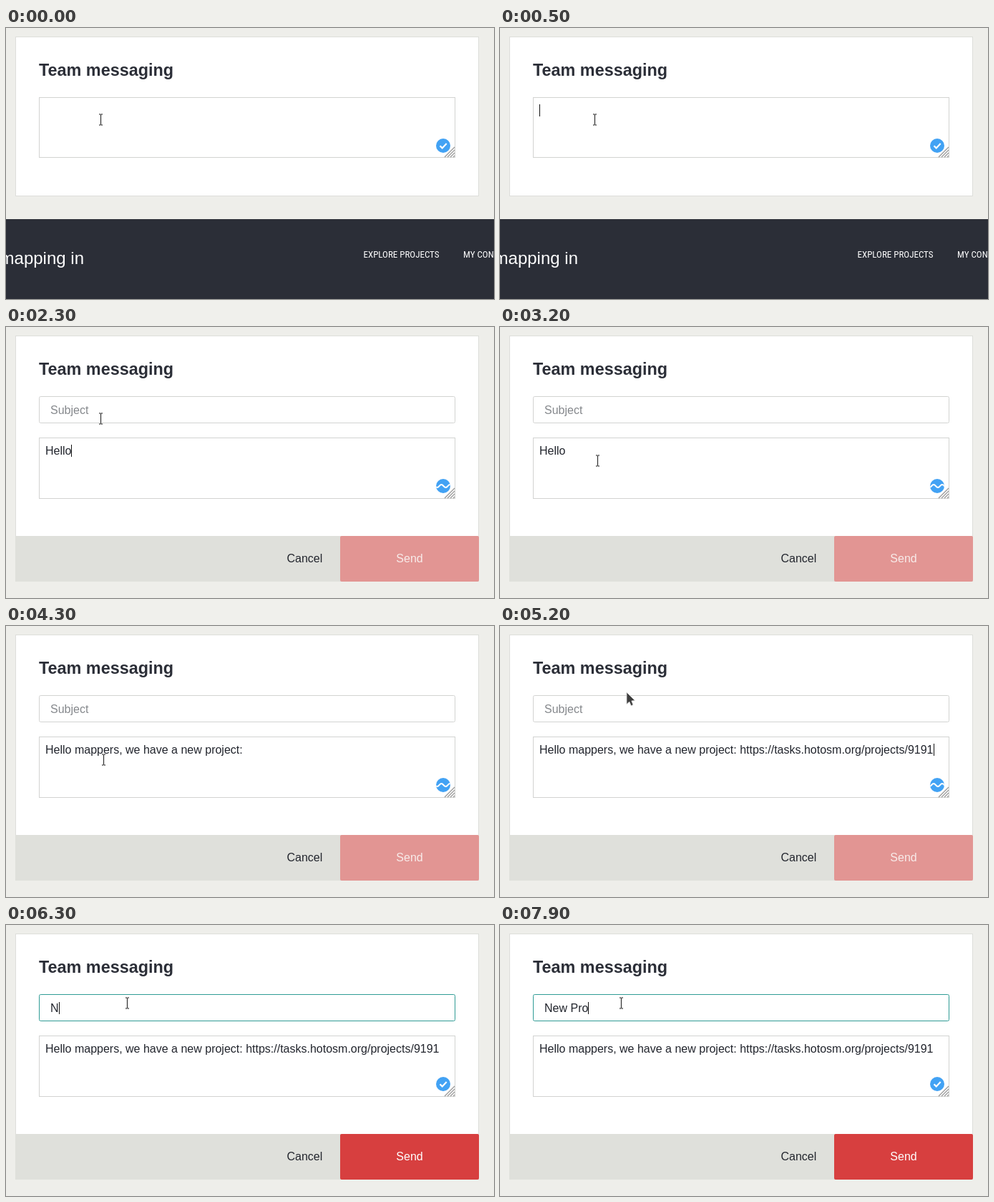
Write an HTML page that moves like this. It is 682 px wide and 380 px high and loops after 8 s.

```html
<!DOCTYPE html>
<html lang="en">
<head>
<meta charset="utf-8">
<title>Team messaging</title>
<style>
html, body { margin: 0; width: 100%; height: 100%; overflow: hidden; background: #eeeeea; }
svg { display: block; }
text { font: 16px "Liberation Sans", Arial, sans-serif; fill: #22252d; white-space: pre; }
.title { font-size: 23.4px; font-weight: 600; fill: #2b2e37; }
.tagline { font-size: 24px; fill: #fff; }
.link { font: 13px "Roboto Condensed", Roboto, sans-serif; font-stretch: 75%; fill: #fff; }
.box { fill: #fff; stroke: #d2d3d1; }
</style>
</head>
<body>
<svg width="682" height="380" viewBox="0 0 682 380">
  <defs><clipPath id="disc"><circle r="10"/></clipPath></defs>
  <rect id="card" x="13.5" y="12.5" width="647" height="223" fill="#fff" stroke="#dddeda"/>
  <text class="title" x="46" y="67">Team messaging</text>

  <g id="footer">
    <rect y="268" width="682" height="112" fill="#2b2e37"/>
    <text class="tagline" x="109" y="331" text-anchor="end">mapping in</text>
    <text class="link" x="499.5" y="322">EXPLORE PROJECTS</text>
    <text class="link" x="639" y="322">MY CONTRIBUTIONS</text>
  </g>

  <g id="form">
    <rect id="field" class="box" x="46.5" y="97.5" width="581" height="37" rx="2"/>
    <text id="subject" x="62" y="122"></text>
    <rect x="13" y="293" width="648" height="64" fill="#dfe0db"/>
    <text x="392.5" y="330">Cancel</text>
    <rect id="send" x="467" y="293" width="194" height="64" rx="2"/>
    <text id="sendLabel" x="564" y="330" text-anchor="middle">Send</text>
  </g>

  <rect id="area" class="box" x="46.5" width="581"/>
  <path id="grip" d="M613 0l14-14M617 0l10-10M621 0l6-6M625 0l2-2" stroke="#999" stroke-width="1.3"/>
  <text id="message" x="55" y="179"></text>
  <rect id="caret" width="1" height="17" fill="#111"/>

  <g id="badge">
    <circle r="10" fill="#42a2f4"/>
    <path id="check" d="M-4.5 .2l3.2 3.2l6-6.3" fill="none" stroke="#fff" stroke-width="2.2"/>
    <path id="wave" clip-path="url(#disc)" fill="none" stroke="#fff" stroke-width="2"/>
  </g>

  <g id="pointer">
    <g id="beam" fill="none">
      <path d="M-2.5-7.5h2l.5.5l.5-.5h2M0-7V7M-2.5 7.5h2l.5-.5l.5.5h2" stroke="#ddd" stroke-width="2.4"/>
      <path d="M-2.5-7.5h2l.5.5l.5-.5h2M0-7V7M-2.5 7.5h2l.5-.5l.5.5h2" stroke="#333"/>
    </g>
    <path id="arrow" d="M0 0V16.5L3.8 13.2L6.3 18.8L9 17.5L6.8 12L11.5 11.5Z" fill="#3e3e3e" stroke="#d8d8d8" stroke-width=".8"/>
  </g>
</svg>
<script>
const LOOP = 8000, TICK = 100;
const MESSAGE = "Hello mappers, we have a new project: https://tasks.hotosm.org/projects/9191";
const SUBJECT = "New Pro";

// [time, value] pairs
const messageKeys = [[0, 0], [1400, 1], [1700, 2], [1900, 4], [2100, 5], [3400, 38], [4500, MESSAGE.length]];
const subjectKeys = [[0, 0], [6300, 1], [6600, 2], [6900, 3], [7000, 4], [7400, 5], [7800, 6], [7900, 7]];
const caretKeys = [[0, 0], [500, 1], [2700, 0], [3400, 1], [4200, 0], [4500, 1], [5400, 0], [5600, 1]];
// [time, x, y]
const pointerPath = [[0, 132.5, 128.5], [2700, 132.5, 128.5], [3200, 136.5, 187.5], [5000, 136.5, 187.5],
  [5200, 177, 93], [5500, 169.5, 109.5], [LOOP, 169.5, 109.5]];

const el = id => document.getElementById(id);
const set = (id, attrs) => { for (const k in attrs) el(id).setAttribute(k, attrs[k]); };
const show = (id, on) => set(id, { visibility: on ? "visible" : "hidden" });
const move = (id, x, y) => set(id, { transform: `translate(${x} ${y})` });
const valueAt = (keys, t) => keys.findLast(k => k[0] <= t)[1];

function pointerAt(t) {
  const i = pointerPath.findIndex(p => p[0] > t);
  const [t0, x0, y0] = pointerPath[i - 1], [t1, x1, y1] = pointerPath[i];
  const u = (t - t0) / (t1 - t0), e = u * u * (3 - 2 * u);
  return [x0 + (x1 - x0) * e, y0 + (y1 - y0) * e];
}

function wavePath(t) {
  const phase = Math.floor((t - 100) / 200) * 0.2;
  let d = "";
  for (let x = -11; x <= 11; x++)
    d += `${d ? "L" : "M"}${x} ${(-2 * Math.cos(2 * Math.PI * ((x + 5) / 12 - phase))).toFixed(2)}`;
  return d;
}

function render(t) {
  const open = t >= 1400, focused = t >= 5600, ready = t >= 6300;
  const waving = t >= 2200 && t < 6000;

  show("form", open);
  show("footer", !open);
  set("card", { height: open ? 344 : 223 });
  set("area", { y: open ? 155.5 : 97.5, height: open ? 85 : 84 });
  move("grip", 0, open ? 240 : 181);
  set("field", { style: focused ? "stroke:#2f9b95" : "" });
  set("send", { fill: ready ? "#d73f3f" : "#e29593" });
  set("sendLabel", { style: `fill:${ready ? "#fff" : "#f8ecea"}` });

  el("message").textContent = MESSAGE.slice(0, valueAt(messageKeys, t));
  el("subject").textContent = ready ? SUBJECT.slice(0, valueAt(subjectKeys, t)) : "Subject";
  set("subject", { style: ready ? "" : "fill:#85888c" });

  const width = focused && !ready ? 0 : el(focused ? "subject" : "message").getComputedTextLength();
  set("caret", { x: Math.round((focused ? 62 : 55) + width), y: focused ? 108 : open ? 165 : 107 });
  show("caret", valueAt(caretKeys, t));

  move("badge", 611, t < 1500 ? 165 : 223);
  show("check", !waving);
  show("wave", waving);
  set("wave", { d: wavePath(t) });

  const [x, y] = pointerAt(t);
  const overText = y > 97 && y < 135 || y > 155 && y < 240;
  move("pointer", x, y);
  show("beam", overText || !open);
  show("arrow", !overText && open);
}

function frame(now) {
  render(Math.floor(now % LOOP / TICK) * TICK);
  requestAnimationFrame(frame);
}
frame(performance.now());
</script>
</body>
</html>
```
